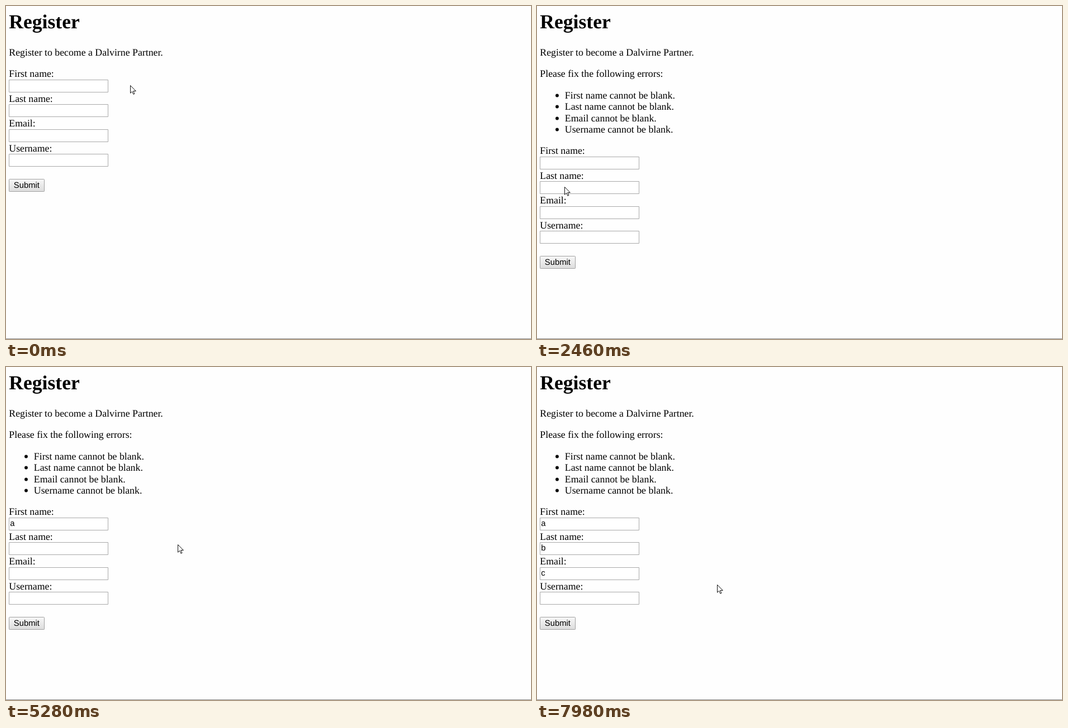
These frames come from a looping animation (939 px wide and 597 px high, 8 s). An HTML page with a canvas:

```html
<!DOCTYPE html>
<html lang="en">
<head>
<meta charset="utf-8">
<title>Register</title>
<style>
html, body { margin: 0; width: 100%; height: 100%; overflow: hidden; background: #fefefe; }
canvas { display: block; }
</style>
</head>
<body>
<canvas id="stage" width="939" height="597"></canvas>
<script>
const ctx = document.getElementById('stage').getContext('2d');
ctx.textRendering = 'geometricPrecision';
const LOOP = 8000;
const SERIF = '17.8px "Liberation Serif", serif';
const TITLE = 'bold 35.6px "Liberation Serif", serif';
const SANS = '14.83px "Liberation Sans", sans-serif';
const MENU = 'bold 12.9px "Open Sans", sans-serif';

const labels = ['First name', 'Last name', 'Email', 'Username'];
const firstNames = ['asdf', 'a', 'aAAAAAAAA', 'adfasfa', 'adsfasdf', 'asdfa'];
const emails = ['c', 'casdf', 'cadsf', 'csdfa', 'cc'];

const arrowShape = new Path2D('M.5 .5V14.2L3.7 11.3 5.9 16.3 7.9 15.4 5.8 10.5H10.3Z');
const beamShape = new Path2D('M-3 -6.5H-.5L.5 -5.5 1.5 -6.5H4M.5 -5.5V5.5M-3 6.5H-.5L.5 5.5 1.5 6.5H4');

// Pointer samples: start time, shape, x, y
const pointer = [
  [0, 'arrow', 222, 142], [870, 'arrow', 222, 147], [1020, 'arrow', 232, 180],
  [1150, 'arrow', 250, 225], [1270, 'arrow', 258, 257], [1410, 'arrow', 226, 277],
  [1530, 'arrow', 165, 301], [1650, 'arrow', 102, 325], [1770, 'arrow', 57, 340],
  [1920, 'arrow', 50, 331], [2040, 'arrow', 49, 324], [3170, 'arrow', 60, 304],
  [3290, 'beam', 75, 280], [3410, 'arrow', 82, 255], [3680, 'beam', 79, 283],
  [4370, 'none'], [4500, 'arrow', 72, 305], [4620, 'arrow', 62, 325],
  [4740, 'arrow', 65, 326], [4890, 'arrow', 160, 328], [5010, 'arrow', 240, 325],
  [5130, 'arrow', 298, 322], [5280, 'arrow', 307, 318], [5400, 'arrow', 174, 327],
  [5560, 'beam', 107, 335], [6260, 'none'], [6380, 'arrow', 130, 340],
  [6500, 'arrow', 220, 345], [6620, 'arrow', 280, 346], [6740, 'arrow', 270, 350],
  [6860, 'beam', 150, 361], [7010, 'beam', 85, 369], [7410, 'none'],
  [7850, 'arrow', 230, 400], [7980, 'arrow', 322, 390]
];
const focus = [[0, -1], [3810, 0], [5280, -1], [5700, 1], [6620, -1], [7140, 2], [7980, -1]];
const hovered = [[0, -1], [4500, 0], [4620, 1], [5010, -1]];
const button = [[0, 'idle'], [1920, 'hover'], [2190, 'pressed'], [2310, 'hover'], [2460, 'idle']];

const at = (track, t) => track.findLast(step => step[0] <= t);
const within = (t, from, to) => t >= from && t < to;

function text(str, x, y, font, color = '#000') {
  ctx.font = font;
  ctx.fillStyle = color;
  ctx.fillText(str, x, y);
}

function rect(x, y, w, h, color) {
  ctx.fillStyle = color;
  ctx.fillRect(x, y, w, h);
}

function outline(x, y, w, h, color, radius = 0) {
  ctx.strokeStyle = color;
  ctx.lineWidth = 1;
  ctx.beginPath();
  ctx.roundRect(x + .5, y + .5, w - 1, h - 1, radius);
  ctx.stroke();
}

function drawField(y, value, focused, preview) {
  rect(5, y, 178, 23, preview ? '#faffbd' : '#fff');
  outline(5, y, 178, 23, focused ? '#5b8ee8' : '#a9a9a9');
  if (focused) outline(4, y - 1, 180, 25, '#7aa4f0', 2);
  text(value, 7.3, y + 15, SANS);
  if (focused) rect(Math.round(7.2 + ctx.measureText(value).width), y + 3, 1, 17, '#000');
}

function drawButton(y, state) {
  const shade = ctx.createLinearGradient(0, y, 0, y + 23);
  const colors = state === 'pressed' ? ['#d8d8d8', '#eee'] : ['#f8f8f8', '#dcdcdc'];
  colors.forEach((color, i) => shade.addColorStop(i, color));
  rect(5, y, 64, 23, shade);
  outline(5, y, 64, 23, state === 'idle' ? '#a0a0a0' : '#777', 1);
  text('Submit', 13.8, y + 16, SANS);
}

function drawMenu(y, items, active) {
  const rowTop = i => Math.round(y + .5 + 26.7 * i);
  const height = Math.round(26.7 * items.length + 2.5);
  rect(5, y, 178, height, '#fefefe');
  rect(5, y, 1, height, '#c8c8c8');
  rect(182, y, 1, height, '#c8c8c8');
  items.forEach((item, i) => {
    if (i === active) rect(6, rowTop(i), 176, rowTop(i + 1) - rowTop(i), '#ccc');
    text(item, 15.3, rowTop(i) + 17, MENU);
  });
}

function drawPointer([, shape, x, y]) {
  if (shape === 'none') return;
  ctx.save();
  ctx.translate(x, y);
  ctx.lineWidth = 1;
  ctx.strokeStyle = '#111';
  if (shape === 'arrow') {
    ctx.fillStyle = '#fff';
    ctx.fill(arrowShape);
    ctx.stroke(arrowShape);
  } else {
    ctx.stroke(beamShape);
  }
  ctx.restore();
}

function drawErrors() {
  text('Please fix the following errors:', 5.3, 127, SERIF);
  labels.forEach((label, i) => {
    const y = Math.round(165.6 + 20.45 * i);
    text(label + ' cannot be blank.', 49.8, y, SERIF);
    ctx.beginPath();
    ctx.arc(36, y - 5.5, 2.9, 0, 2 * Math.PI);
    ctx.fill();
  });
}

function draw(t) {
  const failed = t >= 2460;
  const shift = failed ? 138 : 0;
  const active = at(hovered, t)[1];
  const focused = at(focus, t)[1];
  const fieldTop = i => Math.round(131.5 + 44.5 * i) + shift;
  const values = [
    t < 4370 ? '' : active === 0 ? firstNames[0] : 'a',
    t < 6260 ? '' : 'b',
    t < 7720 ? '' : 'c',
    ''
  ];

  rect(0, 0, 939, 597, '#fefefe');
  text('Register', 5.3, 40, TITLE);
  text('Register to become a Dalvirne Partner.', 5.3, 89, SERIF);
  if (failed) drawErrors();
  labels.forEach((label, i) => {
    text(label + ':', 5.3, Math.round(127.2 + 44.5 * i) + shift, SERIF);
    drawField(fieldTop(i), values[i], focused === i, i === 0 && active >= 0);
  });
  drawButton(310 + shift, at(button, t)[1]);
  if (within(t, 4370, 5280)) drawMenu(fieldTop(0) + 23, firstNames, active);
  if (within(t, 7720, 7980)) drawMenu(fieldTop(2) + 23, emails, -1);
  rect(0, 596, 939, 1, '#8c8c8c');
  drawPointer(at(pointer, t));
}

function tick() {
  draw(performance.now() % LOOP);
  requestAnimationFrame(tick);
}
tick();
</script>
</body>
</html>
```
